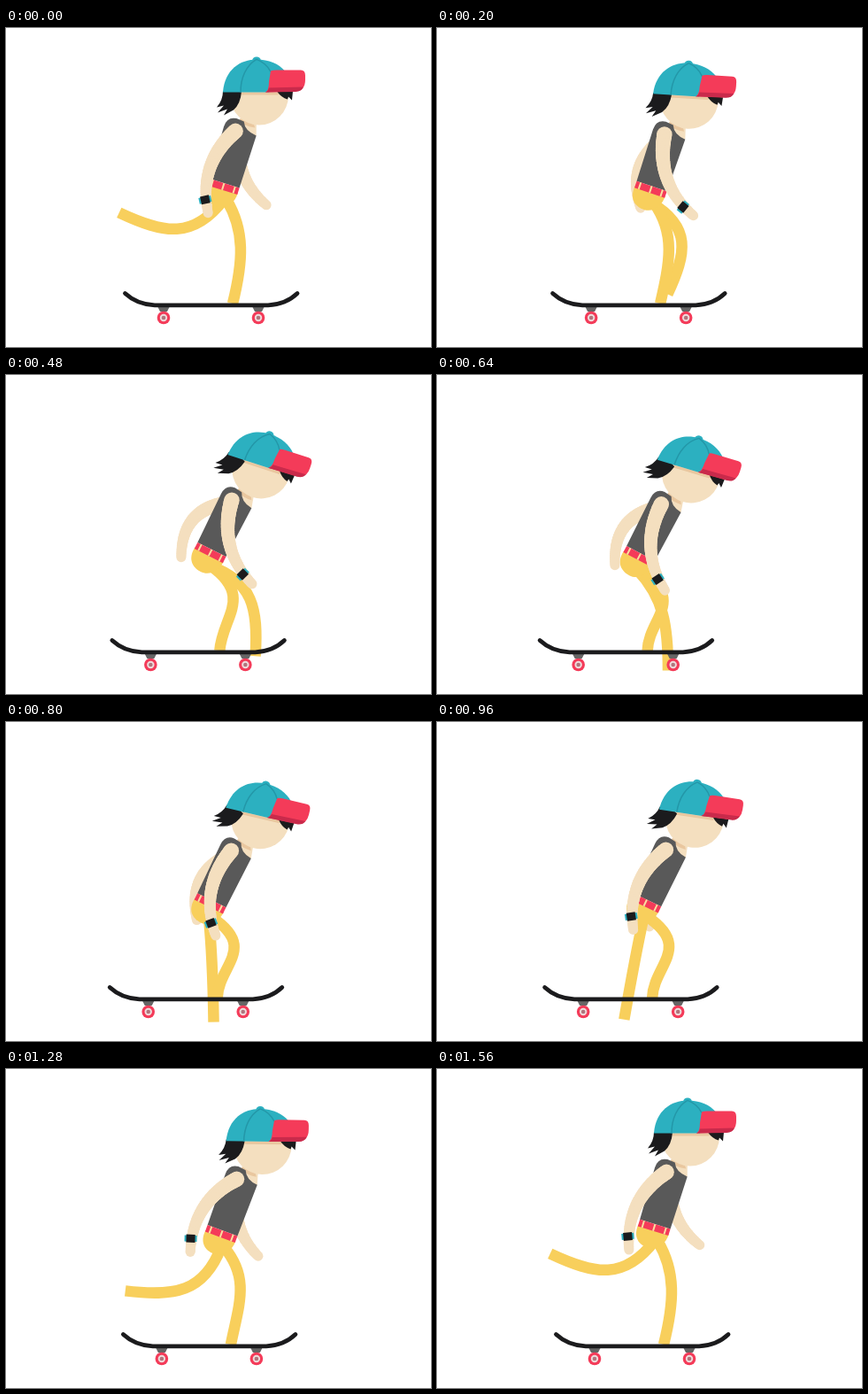
These frames come from a looping animation (480 by 360 pixels, 1.6 s). An HTML page with a canvas:

```html
<!DOCTYPE html>
<html lang="en">
<head>
<meta charset="utf-8">
<title>Skateboarder</title>
<style>
  html, body { margin: 0; height: 100%; overflow: hidden; background: #fff; }
  canvas { display: block; }
</style>
</head>
<body>
<canvas id="stage" width="480" height="360"></canvas>
<script>
const ctx = document.getElementById('stage').getContext('2d');
const LOOP = 1600, STEP = 40;
const SKIN = '#f4dfbf', TAN = '#e9c79f', TEAL = '#2cb0c0', SEAM = '#2397a8', RED = '#f43b59',
  DARK_RED = '#c92a4b', GREY = '#595959', YELLOW = '#f8cf5c', BLACK = '#1b1b1d';

const radians = deg => deg * Math.PI / 180;

// Eased 0 to 1 between two times.
function ease(t, from, to) {
  const u = Math.min(1, Math.max(0, (t - from) / (to - from)));
  return u * u * (3 - 2 * u);
}

// Eased up, hold, eased down; a negative start reaches back over the loop seam.
function pulse(t, start, top, fall, end) {
  if (t > start + LOOP) t -= LOOP;
  return ease(t, start, top) - ease(t, fall, end);
}

// Turns a local frame into stage points.
function frame(x, y, deg) {
  const c = Math.cos(radians(deg)), s = Math.sin(radians(deg));
  return (px, py) => [x + px * c - py * s, y + px * s + py * c];
}

// Limb frame: x runs along the limb, y towards the back; 0 degrees hangs down.
const hang = ([x, y], deg) => frame(x, y, 90 - deg);

const fill = (path, color) => { ctx.fillStyle = color; ctx.fill(new Path2D(path)); };
const line = (path, color, width, cap = 'butt') => {
  ctx.strokeStyle = color;
  ctx.lineWidth = width;
  ctx.lineCap = cap;
  ctx.stroke(new Path2D(path));
};
const disc = (x, y, r, color) => {
  ctx.fillStyle = color;
  ctx.beginPath();
  ctx.arc(x, y, r, 0, 2 * Math.PI);
  ctx.fill();
};
const placed = ([x, y], deg, draw) => {
  ctx.save();
  ctx.translate(x, y);
  ctx.rotate(radians(deg));
  draw();
  ctx.restore();
};

const leg = (...points) => line(`M${points[0]} C${points.slice(1)}`, YELLOW, 12.5);

// Tapered arm bent backwards; returns the wrist and its direction.
function arm(shoulder, deg, length, bend) {
  const at = hang(shoulder, deg);
  for (let u = 0; u <= 1; u += 1 / 60) {
    disc(...at(length * u, 2 * u * (1 - u) * bend), 8.7 - 3.2 * u, SKIN);
  }
  const turn = Math.atan2(-bend, length / 2);
  const wrist = at(length - 17 * Math.cos(turn), -17 * Math.sin(turn));
  return [wrist, 90 - deg + turn * 180 / Math.PI];
}

function drawWatch() {
  fill('M-3.5-7H3.5V7H-3.5Z', TEAL);
  fill('M-4.5-5H4.5V5H-4.5Z', BLACK);
}

function drawTorso() {
  fill('M-18 3 C-20 18 -11 25 0 25 C10 25 18 16 18 3Z', YELLOW);
  fill('M-4-82 H14 L19-65 L8-60 H-4Z', SKIN);
  fill('M-4-78 L13-76 L15-73 Q4-71 -4-75Z', TAN);
  fill('M-18-3 L-19-64 Q-19-76 -8-77 L1-76 Q5-66 19-65 L18-3Z', GREY);
  fill('M-18-3 H18 V5 H-18Z', RED);
  line('M-13-3V5 M0-3V5 M13-3V5', '#f9dda0', 2);
}

function drawHead(hairSwing) {
  disc(0, 0, 33, SKIN);
  ctx.translate(-3, -42);
  fill('M-18 38 H26 L24 41 H-18Z', TAN);
  placed([-28, 37], hairSwing, () =>
    fill('M-10 0 L0-4 L11 0 Q10 14 2 21 L-9 27 L-5 20 L-16 24 L-9 16 L-17 18 Q-10 10 -10 0Z', BLACK));
  fill('M23 37 H41 L40 47 L36 43 L35 46 Q28 44 23 37Z', BLACK);
  fill('M-38 38 C-36 12 -18 1 0 1 C14 1 25 6 32 14 L14 38Z', TEAL);
  fill('M-5 2 Q-4-2 0-2 Q4-2 5 2Z', TEAL);
  line('M0 1 C-12 8 -18 22 -18 38 M0 1 C8 4 13 9 16 15', SEAM, 1.5);
  fill('M16 14 Q18 13 22 13 H50 Q55 13 55 19 V24 Q55 36 44 37 L10 38 Q14 36 14 26Z', RED);
  fill('M10 38 Q13 37 14 33 L53 32 Q51 37 44 37.5Z', DARK_RED);
}

function drawBoard() {
  for (const x of [160, 267]) {
    fill(`M${x - 7} 314 h14 l-3 6 h-8Z`, '#666');
    disc(x, 327, 7.3, RED);
    disc(x, 327, 4.2, '#eedcdc');
    disc(x, 327, 2.3, '#b0757d');
  }
  line('M116.5 299.5 Q130 312 150 312.8 H278 Q298 312 311 299.5', BLACK, 4.8, 'round');
}

function draw(t) {
  const roll = 18 - 18.5 * pulse(t, 0, 680, 680, 1440);
  const crouch = pulse(t, 80, 620, 900, 1480);
  const plant = pulse(t, 400, 880, 960, 1320);
  const nod = 18 * pulse(t, 80, 500, 500, 1400);
  const reach = pulse(t, -40, 360, 480, 1520);

  const hips = [227.5 + roll + 3 * plant, 178 + 26 * crouch];
  const lean = 17 + 12 * crouch - 3 * plant;
  const body = frame(...hips, lean);

  ctx.fillStyle = '#fff';
  ctx.fillRect(0, 0, 480, 360);
  arm(body(0, -62), 23 - 67 * reach, 88, 25 + 18 * reach);

  // The pushing leg swings forward, pushes along the ground, then kicks back.
  const swing = -83 + 112 * ease(t, 0, 270) - 40 * ease(t, 400, 1060) - 72 * ease(t, 900, 1460);
  const length = 119 - 14 * pulse(t, 0, 200, 200, 640);
  const knee = 41 * plant - 40;
  const thigh = hang(body(5, 15), swing);
  leg(thigh(0, 0), thigh(length * 0.33, knee), thigh(length * 0.6, knee * 0.75), thigh(length, 0));

  const [hipX, hipY] = body(8, 14), footX = 238 + roll;
  leg([hipX, hipY], [hipX + 21 + 32 * crouch, hipY + 35],
    [footX + 12 - 11 * crouch, 263 + 12 * crouch], [footX, 311]);

  placed(hips, lean, drawTorso);
  const wrist = arm(body(-5, -63), -32 + 54 * pulse(t, -120, 240, 240, 1240), 99, 29);
  placed(...wrist, drawWatch);
  placed(body(9, -109), nod, () => drawHead(15 * crouch));
  placed([roll, 0], 0, drawBoard);
}

function tick() {
  draw(Math.floor(performance.now() / STEP) * STEP % LOOP);
  requestAnimationFrame(tick);
}
tick();
</script>
</body>
</html>
```
